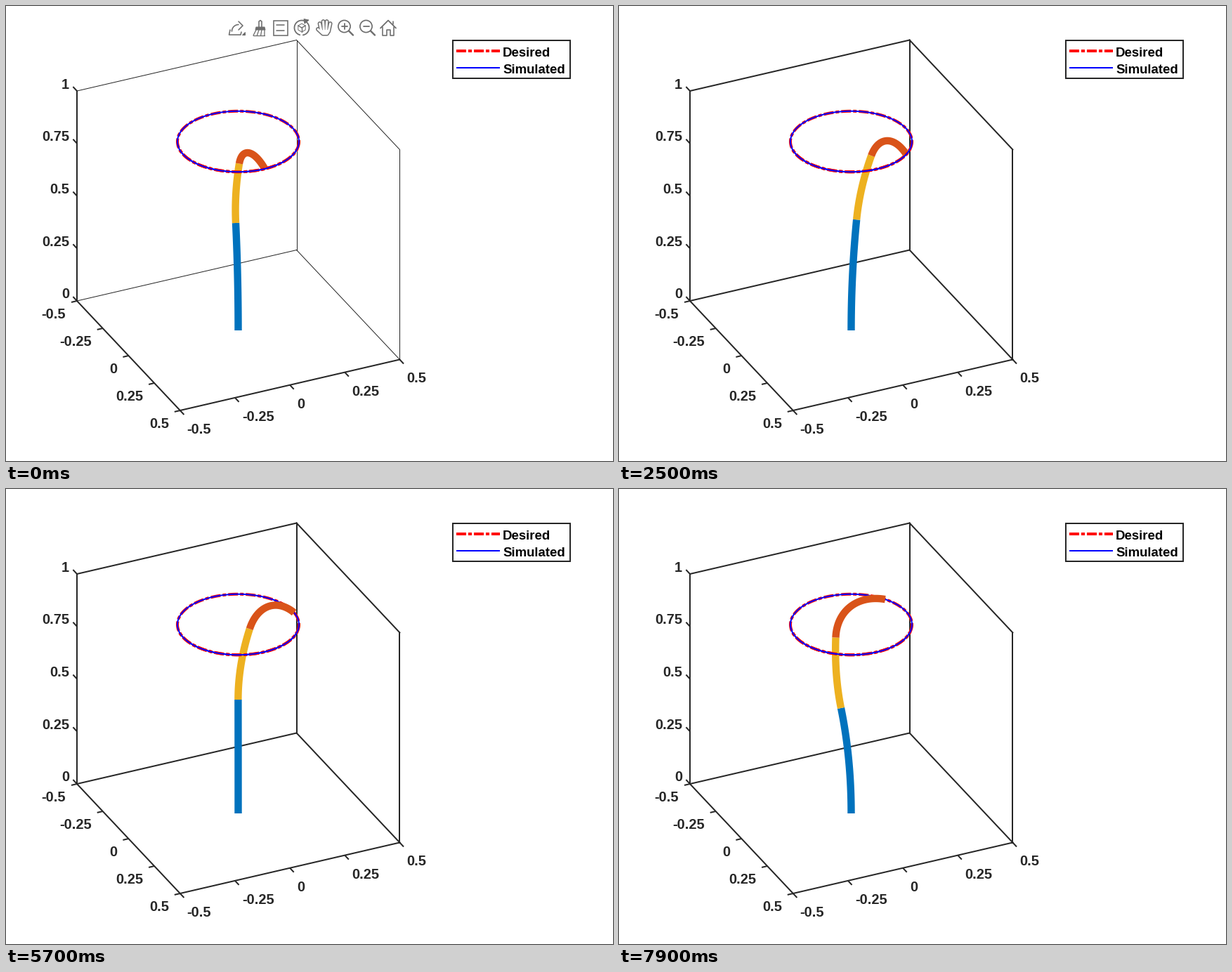
A matplotlib script that plays this animation: 864x648 px, repeating every 8000 ms.

```python
import numpy as np
import matplotlib.pyplot as plt
from matplotlib.animation import FuncAnimation
from matplotlib.patches import Circle, Polygon, Rectangle

INK = (0.15, 0.15, 0.15)
GREY = (0.43, 0.43, 0.43)
BLUE, YELLOW, ORANGE = "#0072BD", "#EDB120", "#D95319"
plt.rcParams["font.family"] = "Liberation Sans"
plt.rcParams["path.simplify"] = False

# 72 dpi: one point is one pixel
fig = plt.figure(figsize=(12, 9), dpi=72, facecolor="white")
ax = fig.add_axes([0, 0, 1, 1])
ax.set_xlim(0, 864)
ax.set_ylim(648, 0)
ax.axis("off")


def line(pts, color=INK, lw=2.0, z=1, cap="butt", **kw):
    x, y = np.asarray(pts, float).T
    if "dashes" not in kw:
        kw["solid_capstyle"] = cap
    return ax.plot(x, y, color=color, lw=lw, zorder=z, **kw)[0]


def label(x, y, text, ha="left", size=20, color=INK):
    ax.text(x, y, text, ha=ha, va="baseline", size=size,
            weight="bold", color=color, zorder=9)


# Axes box, orthographic view
ORIGIN = np.array([101.0, 420.0])
EX, EY, EZ = np.array([[146.8, 156], [312.6, -72.5], [0, -299]])


def project(x, y, z):
    return ORIGIN + x * EX + y * EY + z * EZ


def edges(*corners):
    """Join cube corners named by their digits, such as 011."""
    pts = [project(*map(int, c)) for c in corners]
    return [line(pair, cap="projecting") for pair in zip(pts, pts[1:])]


back_edges = (edges("001", "011", "111", "110")
              + edges("000", "010", "110") + edges("011", "010"))
edges("001", "000", "100", "110")

OUT = np.array([5.6, 6.0])
SIDE = np.array([-8.0, 1.9])
for f in np.linspace(0, 1, 5):
    side = f"{f - 0.5:g}"
    pz, px, py = project(0, 0, f), project(f, 0, 0), project(1, f, 0)
    line([pz, pz - OUT])
    line([px, px + SIDE])
    line([py, py + OUT])
    label(90.2, pz[1] - 3.5, f"{f:g}", "right")
    label(px[0] - 16, px[1] + 25, side, "right")
    label(py[0] + 9.8, py[1] + 33, side)

# Circular path, front part drawn again over the arm
DASH = dict(dashes=(3.5, 0.75, 1.25, 0.75))


def arc(cx, cy, r, a0, a1, squash=1.0, n=60):
    a = np.radians(np.linspace(a0, a1, n))
    return np.column_stack([cx + r * np.cos(a), cy + r * squash * np.sin(a)])


def on_path(a0, a1, n):
    return arc(330.5, 193, 86.5, a0, a1, 0.5, n)


loop = on_path(0, 360, 241)
front = Rectangle((0, 204), 864, 300, transform=ax.transData)
for z in (3, 6):
    for art in (line(loop, "red", 4, z, **DASH), line(loop, "blue", 2, z + 0.1)):
        if z == 6:
            art.set_clip_path(front)

# Legend
ax.add_patch(Rectangle((636, 49), 167, 54, fc="white", ec=INK, lw=2, zorder=7))
line([(641, 64), (703, 64)], "red", 4, 8, **DASH)
line([(641, 88), (703, 88)], "blue", 2, 8)
label(707, 71.5, "Desired", size=18.6, color="black")
label(707, 96, "Simulated", size=18.6, color="black")

# Toolbar, visible only at the start
tools = []


def stroke(pts, lw=1.6, color=GREY, z=10):
    tools.append(line(pts, color, lw, z, "round", solid_joinstyle="round"))


def shape(patch):
    patch.set_zorder(10)
    tools.append(ax.add_patch(patch))


def fill(pts, fc=GREY):
    shape(Polygon(pts, closed=True, fc=fc, ec=GREY, lw=1))


def mirror(cx, half):
    """Complete a left half outline, given relative to cx."""
    return ([(cx + x, y) for x, y in half]
            + [(cx - x, y) for x, y in reversed(half)])


def export_icon():
    stroke([(319, 34), (317.5, 41), (334, 41), (335, 37)])
    stroke(arc(331, 36, 9.5, 180, 270))
    stroke([(331, 22), (337, 28), (331, 34)])
    fill([(336, 41), (340, 41), (340, 37)])


def brush_icon():
    stroke(mirror(362, [(-2, 30), (-2, 22), (0, 20.5)]))
    fill(mirror(362, [(-7, 34), (-6, 30)]))
    for i in range(4):
        stroke([(356 + 4 * i, 34), (352 + 5.3 * i, 42)], 1.3)
    stroke([(352, 42), (368, 42)], 1.3)


def tip_icon():
    shape(Rectangle((380.5, 20.5), 20, 21, fc="white", ec=GREY, lw=1.6))
    for y in (27, 35):
        stroke([(385, y), (396, y)])


def rotate_icon():
    stroke(arc(421, 31, 10.5, 105, 290), 1.8)
    stroke(arc(421, 31, 10.5, -50, 80), 1.8)
    fill([(424, 18.5), (431, 20), (425, 25)])
    fill(arc(421, 31, 6, -90, 210, n=6), "white")
    for x, y in arc(421, 31, 6, -150, 90, n=3):
        stroke([(421, 31), (x, y)], 1.4)


def hand_icon():
    for lw, color, z in [(6, GREY, 10), (3, "white", 11)]:
        for i in range(4):
            x, reach = 449 + 3.4 * i, 8 + 3 * (0 < i < 3)
            stroke([(x, 36), (x + 1.6 * (i - 1.5), 33 - reach)], lw, color, z)
        stroke([(444, 33), (451, 39.5), (457, 39.5), (459, 36)], lw, color, z)
    stroke([(451, 36), (457, 36)], 5, "white", 11)


def zoom_icon(x, plus):
    shape(Circle((x, 29), 8.6, fc="white", ec=GREY, lw=1.7))
    stroke([(x - 4, 29), (x + 4, 29)], 1.8)
    if plus:
        stroke([(x, 25), (x, 33)], 1.8)
    stroke([(x + 6.5, 35.5), (x + 12.5, 41.5)], 2.4)


def home_icon():
    stroke(mirror(544, [(-11, 31.5), (0, 20.5)]), 1.8)
    stroke(mirror(544, [(-8, 30), (-8, 42), (-2.5, 42), (-2.5, 34)]))
    stroke([(551, 21.5), (551, 26)])


for draw in (export_icon, brush_icon, tip_icon, rotate_icon, hand_icon, home_icon):
    draw()
zoom_icon(481.5, True)
zoom_icon(512.5, False)

# Arm: three conic sections that share a tangent at each joint.
# Each joint follows a smooth curve through five evenly spaced points.
BASE, LIFT = np.array([330.5, 462.0]), np.array([330.5, 383.0])
LAST = 40


def curve(*pts):
    coef = np.polyfit(np.linspace(0, 1, len(pts)), np.array(pts), len(pts) - 1)
    return lambda s: np.array([np.polyval(c, s) for c in coef.T])


joint1 = curve((327, 309), (336.8, 305.2), (337.8, 301.8), (329.2, 300.2), (316, 312))
joint2 = curve((332, 224.5), (355.4, 216), (360.6, 206), (344.2, 199.1), (308.5, 211.5))


def conic(a, ctrl, b, w):
    t = np.linspace(0, 1, 40)[:, None]
    wa, wc, wb = (1 - t) ** 2, 2 * w * t * (1 - t), t ** 2
    return (wa * a + wc * ctrl + wb * b) / (wa + wc + wb)


arm = [line([BASE, LIFT], c, 10.4, 5, snap=False) for c in (BLUE, YELLOW, ORANGE)]


def update(i):
    k = (i + 1) // 2
    s = k / LAST
    j1, j2 = joint1(s), joint2(s)
    angle = 64 - 3 * k
    tip = on_path(angle, angle, 1)[0]
    c2 = j1 + (0.57 + 0.08 * s ** 3) * (j1 - LIFT)
    c3 = j2 + (1.04 + 0.18 * s) * (j2 - c2)
    curves = [conic(BASE, LIFT, j1, 1), conic(j1, c2, j2, 0.98),
              conic(j2, c3, tip, 0.66 + 0.1 * s)]
    for art, pts in zip(arm, curves):
        art.set_data(*pts.T)
    for art in back_edges:
        art.set_linewidth(1 if k == 0 else 2)
    for art in tools:
        art.set_visible(k == 0)
    return arm + back_edges + tools


anim = FuncAnimation(fig, update, frames=80, interval=100,
                     init_func=lambda: update(0), repeat=True, repeat_delay=0)
plt.show()
```
